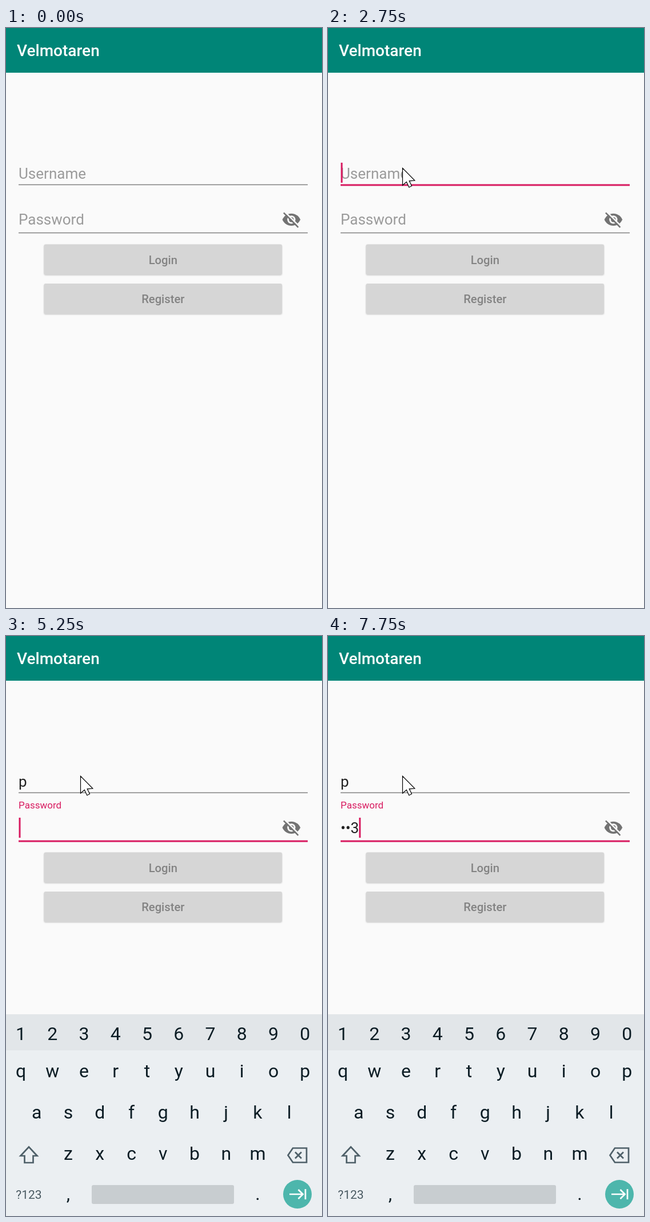
Recreate the animation shown at these times as an HTML page. Size 553 px wide and 1012 px high, loop 8000 ms.

```html
<!DOCTYPE html>
<html lang="en">
<head>
<meta charset="utf-8">
<title>Login screen</title>
<style>
  html, body { margin: 0; width: 100%; height: 100%; overflow: hidden; background: #fafafa; }
  svg { display: block; width: 553px; height: 1012px; font-family: Roboto, sans-serif; }
  .title { font-size: 28px; font-weight: 500; fill: #fff; }
  .hint { font-size: 26px; fill: #9b9b9b; }
  .value { font-size: 26px; fill: #212121; }
  .label { font-size: 17px; fill: #d81b60; }
  .button rect { fill: #d6d6d6; filter: drop-shadow(0 1px 1px #0003); }
  .button text { font-size: 20.2px; font-weight: 500; fill: #838383; text-anchor: middle; }
  .line { fill: #808080; }
  .line.on, .caret { fill: #d81b60; }
  .keys text { font-size: 32px; fill: #0b1c24; text-anchor: middle; }
  .keys .digit { font-size: 14.5px; font-weight: 500; fill: #737b80; }
  .keys .word { font-size: 26px; fill: #566269; }
  .keys .mode { font-size: 21px; fill: #4a5a62; }
  .icon { fill: none; stroke: #4f6069; stroke-width: 2.7; }
  .solid { fill: #4f6069; }
</style>
</head>
<body>
<svg viewBox="0 0 553 1012">
  <rect width="553" height="1012" fill="#fafafa"/>
  <rect width="553" height="78" fill="#008577"/>
  <text class="title" x="19" y="49">Velmotaren</text>

  <text class="hint" id="userHint" x="22" y="263">Username</text>
  <text class="value" id="user" x="22" y="263"></text>
  <rect id="composing" x="22" y="266.5" width="15" height="1.6" fill="#212121"/>
  <rect id="userLine" x="22" width="506"/>

  <text class="hint" id="passHint" x="22" y="343">Password</text>
  <text class="label" id="passLabel" x="22" y="301">Password</text>
  <text class="value" id="pass" x="22" y="344"></text>
  <rect id="passLine" x="22" width="506"/>
  <rect class="caret" id="caret" width="3" height="35"/>

  <g transform="translate(482.2 317.2) scale(1.43)" fill="#737373">
    <path d="M1 12c1.73 4.39 6 7.5 11 7.5s9.27-3.11 11-7.5c-1.73-4.39-6-7.5-11-7.5S2.73 7.61 1 12z"/>
    <circle cx="12" cy="12" r="5" fill="#fafafa"/>
    <circle cx="12" cy="12" r="3"/>
    <path d="M3.9 2.4L21.6 20.1" stroke="#fafafa" stroke-width="1.9"/>
    <path d="M2.6 3.6L20.4 21.4" stroke="#737373" stroke-width="1.8"/>
  </g>

  <g class="button">
    <rect x="66.5" y="377.5" width="416.5" height="53" rx="3"/>
    <text x="274.8" y="412">Login</text>
  </g>
  <g class="button">
    <rect x="66.5" y="446" width="416.5" height="53" rx="3"/>
    <text x="274.8" y="480">Register</text>
  </g>

  <g class="keys" id="keyboard">
    <rect y="660" width="553" height="360" fill="#ebeff2"/>
    <rect y="660" width="553" height="63" fill="#e2e6e9"/>
    <g id="letters"></g>
    <g id="numberRow"></g>
    <g id="textMode">
      <g id="digits"></g>
      <circle cx="28.5" cy="691.5" r="21.5" fill="#fafafa" style="filter:drop-shadow(0 1px 1px #0004)"/>
      <path class="icon" d="M24.5 685l7 6.7-7 6.7"/>
      <rect class="solid" x="522.8" y="678.5" width="8" height="16.5" rx="4"/>
      <path class="icon" style="stroke-width:2.2" d="M518.5 690.5a8.4 8.4 0 0 0 16.8 0M526.9 699v6"/>
      <circle class="icon" cx="163.5" cy="974.5" r="13.2"/>
      <g class="solid">
        <circle cx="158.8" cy="970.5" r="2.1"/>
        <circle cx="168.2" cy="970.5" r="2.1"/>
        <path d="M156 977.5h15a8 7 0 0 1-15 0z"/>
      </g>
    </g>
    <g id="suggestions">
      <path d="M193 674v35M355 674v35" stroke="#c6cbce" stroke-width="1.6"/>
      <text class="word" x="120" y="702">p</text>
      <text class="word" x="273" y="702">please</text>
      <text class="word" x="426" y="702">I</text>
    </g>
    <path class="icon" d="M40 891.5L25.5 907H32.5V919H47.5V907H54.5Z"/>
    <path class="icon" d="M502 893.5H526V918.5H502L493.5 906ZM506 900.5l11 11M517 900.5l-11 11"/>
    <text class="mode" x="40" y="982">?123</text>
    <text x="109" y="984">,</text>
    <text x="440.5" y="984">.</text>
    <rect id="space" y="958" height="33" rx="3" fill="#c8cdd0"/>
    <circle cx="510" cy="974" r="25" fill="#4db6ac"/>
    <path d="M496 974H519M511.5 966l8 8-8 8M524 965v18" fill="none" stroke="#fff" stroke-width="2.7"/>
  </g>

  <path id="pointer" d="M.5 .5V30.5L7.3 24.5 11.8 34 16.5 31.5 12.2 22.8 21.8 22Z"
        fill="#fff" stroke="#000" stroke-width="1.2"/>
</svg>

<script>
const LOOP = 8000;
const $ = id => document.getElementById(id);

// Each step lists only what changes at that time.
const steps = [
  [0, { pointer: null, focus: '', caret: null, user: '', pass: '', keyboard: '' }],
  [250, { pointer: [274, 803] }],
  [500, { pointer: [267, 604] }],
  [750, { pointer: [240, 494] }],
  [1000, { pointer: [168, 337] }],
  [1250, { pointer: [160, 294] }],
  [2000, { pointer: [145, 278] }],
  [2250, { pointer: [132, 248] }],
  [2500, { pointer: [130, 244] }],
  [2750, { focus: 'user', caret: 22.5 }],
  [4000, { caret: null, keyboard: 'opening' }],
  [4250, { user: 'p', caret: 36.6, keyboard: 'text' }],
  [4750, { caret: null }],
  [5000, { caret: 36.6 }],
  [5250, { focus: 'pass', caret: 22.5, keyboard: 'password' }],
  [5750, { caret: null }],
  [6250, { pass: '1', caret: 36.6 }],
  [6500, { pass: '•2', caret: 45.6 }],
  [6750, { pass: '••3', caret: 54.3 }],
  [7250, { caret: null }],
  [7750, { caret: 54.3 }]
];

function addRow(parent, chars, x, y, className = '') {
  [...chars].forEach((char, i) => {
    const key = document.createElementNS('http://www.w3.org/2000/svg', 'text');
    key.setAttribute('x', x + i * 55.25);
    key.setAttribute('y', y);
    key.setAttribute('class', className);
    key.textContent = char;
    $(parent).append(key);
  });
}

addRow('letters', 'qwertyuiop', 26, 770);
addRow('letters', 'asdfghjkl', 53.7, 842);
addRow('letters', 'zxcvbnm', 109, 914);
addRow('numberRow', '1234567890', 26, 704.5);
addRow('digits', '1234567890', 43, 748, 'digit');

function show(id, visible) {
  $(id).style.display = visible ? '' : 'none';
}

function setAttributes(id, values) {
  for (const name in values) $(id).setAttribute(name, values[name]);
}

function setLine(id, y, focused) {
  setAttributes(id, {
    class: focused ? 'line on' : 'line',
    y: focused ? y - 0.5 : y - 0.3,
    height: focused ? 3 : 1.5
  });
}

function render(time) {
  const state = Object.assign({}, ...steps.filter(([at]) => at <= time).map(([, change]) => change));
  const { pointer, focus, caret, user, pass, keyboard } = state;
  const onPass = focus === 'pass';
  const opening = keyboard === 'opening';
  const secret = keyboard === 'password';

  show('pointer', pointer);
  if (pointer) setAttributes('pointer', { transform: `translate(${pointer})` });

  $('user').textContent = user;
  $('pass').textContent = pass;
  show('userHint', !user);
  show('composing', user && !onPass);
  show('passHint', !onPass);
  show('passLabel', onPass);
  setLine('userLine', 273, focus === 'user');
  setLine('passLine', 357, onPass);

  show('caret', caret !== null);
  if (caret !== null) setAttributes('caret', { x: caret, y: onPass ? 317 : 235 });

  show('keyboard', keyboard);
  setAttributes('keyboard', {
    transform: `translate(0 ${opening ? 6 : 0})`,
    opacity: opening ? 0.92 : 1
  });
  show('textMode', !secret);
  show('suggestions', keyboard === 'text');
  show('numberRow', secret);
  setAttributes('space', { x: secret ? 150 : 205, width: secret ? 249 : 194 });
}

const start = performance.now();
function tick() {
  render((performance.now() - start) % LOOP);
  requestAnimationFrame(tick);
}
tick();
</script>
</body>
</html>
```
